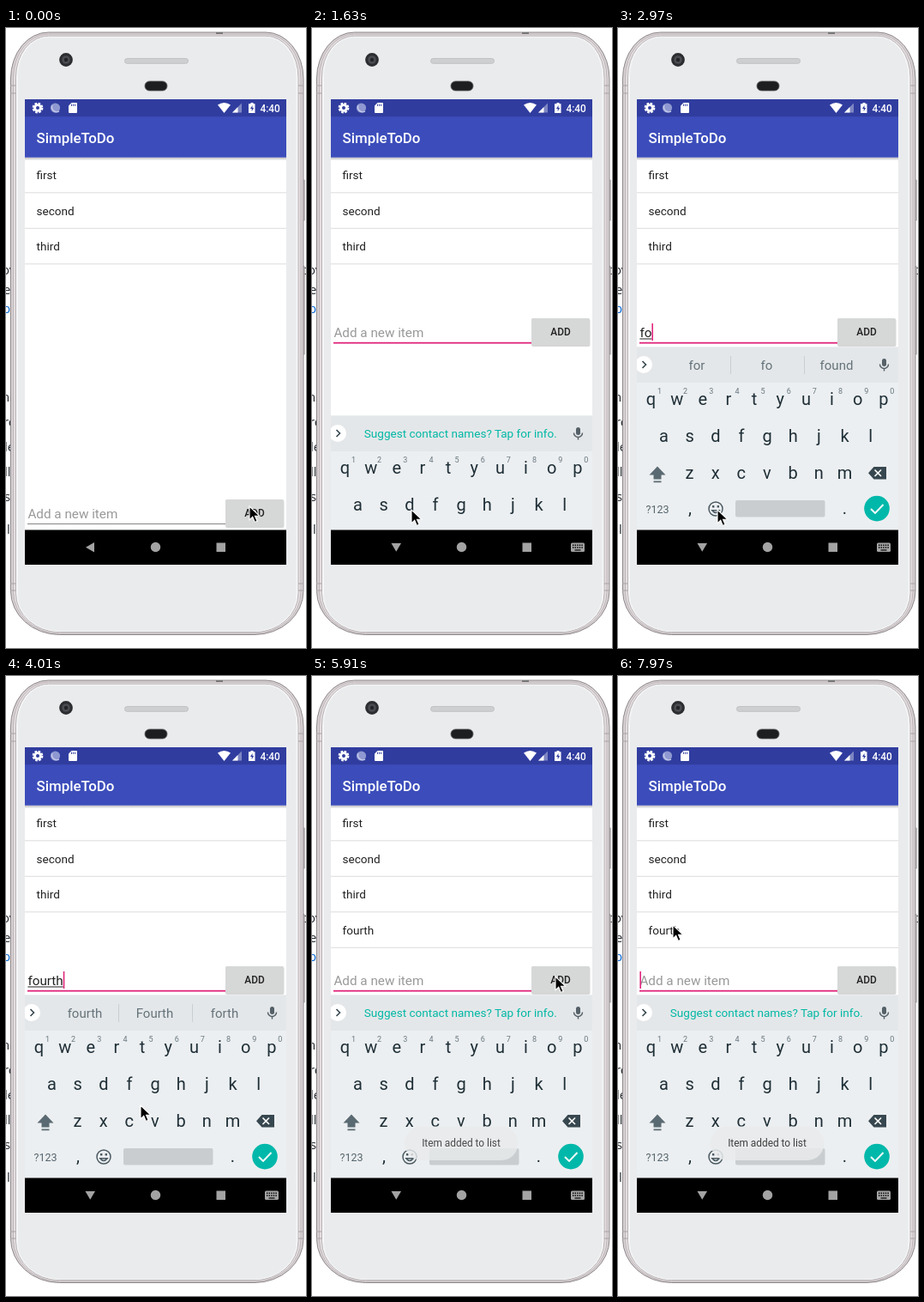
Write an HTML page that moves like this. It is 350x722 px and loops after 8000 ms.

```html
<!DOCTYPE html>
<html lang="en">
<head>
<meta charset="utf-8">
<title>To-do list</title>
<style>
  html, body { margin: 0; width: 100%; height: 100%; overflow: hidden; background: #fff; }
  svg { display: block; width: 350px; height: 722px; font-family: Roboto, sans-serif; }
  text { white-space: pre; }
  .mid { text-anchor: middle; }
  .medium { font-weight: 500; }
</style>
</head>
<body>
<svg viewBox="0 0 350 722">
  <defs>
    <clipPath id="screen"><rect x="22" y="83" width="305" height="542"/></clipPath>
    <clipPath id="content"><rect x="22" y="83" width="305" height="501.5"/></clipPath>
    <linearGradient id="shade" x2="0" y2="1">
      <stop stop-color="#000" stop-opacity=".26"/>
      <stop offset="1" stop-color="#000" stop-opacity="0"/>
    </linearGradient>
  </defs>

  <g id="page" font-size="15" font-family="Open Sans, sans-serif"></g>

  <g id="phone">
    <path d="M346 177h2.4v47H346zM346 278h2.4v102H346z" fill="#c4bdc0" stroke="#958f92" stroke-width=".6"/>
    <g id="shell"></g>
    <path d="M5 67h6M5 76h6M341 67h6M341 76h6M5 647h6M5 655h6M341 647h6M341 655h6" stroke="#a8a1a4"/>
    <path d="M245 6h8" stroke="#777" stroke-width="2"/>
    <circle cx="70" cy="37" r="7.9" fill="#2c2d30"/>
    <circle cx="70" cy="37" r="4.8" fill="#4a4c51"/>
    <circle cx="70" cy="37" r="2.2" fill="#222326"/>
    <rect x="138.5" y="35.5" width="74" height="5.8" rx="2.8" fill="#cdcfd1" stroke="#b9bbbd" stroke-width=".8"/>
    <rect x="162" y="62" width="26" height="11" rx="5.5" fill="#1d1e20" stroke="#55575a" stroke-width=".8"/>
  </g>

  <g clip-path="url(#screen)">
    <path d="M22 83h305v542H22z" fill="#fff"/>
    <g id="list" font-size="13.55" fill="#212121"></g>
    <path d="M22 150.8h305v3.6H22z" fill="url(#shade)"/>
    <path d="M22 103h305v47.8H22z" fill="#3c4dbb"/>
    <path d="M22 83h305v20.3H22z" fill="#303d9f"/>
    <text class="medium" x="35.5" y="133.5" font-size="16.9" fill="#fff">SimpleToDo</text>

    <g id="status" fill="#fff">
      <circle cx="37" cy="93" r="5.3" fill="none" stroke="#fff" stroke-width="2.2" stroke-dasharray="2.6 1.56"/>
      <circle cx="37" cy="93" r="3.4" fill="none" stroke="#fff" stroke-width="2.8"/>
      <circle cx="57.5" cy="93" r="5.6" fill="#8f98d0"/>
      <path d="M54 90a5.6 5.6 0 0 0 8 7" fill="none" stroke="#c4c9e8" stroke-width="1.4"/>
      <path d="M76.5 87H82q1 0 1 1v10q0 1-1 1h-8q-1 0-1-1v-7.5z"/>
      <path d="M76.5 88.5v2.5M78.5 88.5v2.5M80.5 88.5v2.5" stroke="#303d9f" stroke-width=".9"/>
      <path d="M247 89.5q7.5-5 15 0l-7.5 9.5z"/>
      <path d="M275 87.5v11h-11z" opacity=".38"/>
      <path d="M270.5 92v6.5H264z"/>
      <path d="M285.5 87h3v1.2h2V99H283V88.2h2.5z"/>
      <path d="M287.5 90l-2.5 4h1.7v3l2.5-4h-1.7z" fill="#303d9f"/>
      <text class="medium" x="296.4" y="97.5" font-size="11.86">4:40</text>
    </g>

    <g id="field">
      <rect id="line" x="25" width="231"/>
      <text id="hint" x="25.4" y="571" font-size="15.25">Add a new item</text>
      <text id="typed" x="25.4" y="571" font-size="15.25" fill="#212121"></text>
      <rect id="under" x="25.4" y="572.5" height="1" fill="#212121"/>
      <rect id="caret" y="555" width="1.6" height="20" fill="#e0267c"/>
      <rect x="256" y="550" width="68.5" height="32" rx="2" fill="#000" opacity=".16"/>
      <rect x="256" y="549" width="68" height="31.5" rx="1.5" fill="#d6d7d7"/>
      <text class="mid medium" x="290" y="568.8" font-size="11.86" fill="#212121">ADD</text>
    </g>

    <g clip-path="url(#content)">
      <g id="keyboard">
        <path d="M22 371.5h305V585H22z" fill="#eceff1"/>
        <path d="M22 371.5h305V413H22z" fill="#e4e7e9"/>
        <circle cx="30" cy="392" r="10" fill="#fff"/>
        <path d="M28.5 388l4 4-4 4" fill="none" stroke="#37474f" stroke-width="1.6"/>
        <text id="tip" class="mid" x="173.3" y="397" font-size="13.55" fill="#00b8a5">Suggest contact names? Tap for info.</text>
        <g id="words" font-size="15" fill="#65737a"></g>
        <rect x="308" y="385" width="5" height="9" rx="2.5" fill="#546067"/>
        <path d="M305.5 391.5a5 5 0 0 0 10 0M310.5 396.5v3" fill="none" stroke="#546067" stroke-width="1.5"/>
        <g id="keys" font-size="20" fill="#1f2f37"></g>
        <path d="M46 510.5l9.5 10h-5v5h-9v-5h-5zM41.5 527.5h9v1.8h-9z" fill="#5a6a72"/>
        <path d="M298.500 511H313v14.5h-14.5l-6.5-7.25z" fill="#37474f"/>
        <path d="M299.5 514.5l7.5 7.5m0-7.5l-7.5 7.5" stroke="#fff" stroke-width="1.7"/>
        <text class="mid" x="46" y="564.5" font-size="12.5" fill="#54646c">?123</text>
        <g fill="none" stroke="#4a5a62" stroke-width="1.5">
          <circle cx="114" cy="560" r="8"/>
          <path d="M109.8 561.8q4.2 5.5 8.4 0z"/>
        </g>
        <path d="M110 556h2.4v2.4H110zM115.6 556h2.4v2.4h-2.4z" fill="#4a5a62"/>
        <rect x="137" y="550" width="104.5" height="19.5" rx="2" fill="#c9cdd0"/>
        <circle cx="302" cy="559.6" r="14.8" fill="#00b8aa"/>
        <path d="M295 560l5 5 9.5-10" fill="none" stroke="#fff" stroke-width="1.9"/>
      </g>
    </g>

    <g id="toast">
      <rect x="108" y="524.5" width="132.500" height="39.5" rx="19.7" fill="#e9ebec"/>
      <text class="mid" x="174" y="548" font-size="11.86" fill="#212121">Item added to list</text>
    </g>

    <path d="M22 584.5h305V625H22z" fill="#000"/>
    <g fill="#a3a3a3">
      <path id="back"/>
      <circle cx="174.5" cy="604.5" r="5.7"/>
      <path d="M245.5 599.5H256V610h-10.5z"/>
      <g id="switcher">
        <rect x="302" y="599.5" width="16" height="10.5" rx="1.5"/>
        <path d="M304 602.3h12M304 605h12" stroke="#000" stroke-width="1.4" stroke-dasharray="1.4 1.2"/>
        <path d="M306.5 608h7" stroke="#000" stroke-width="1.2"/>
      </g>
    </g>
  </g>

  <path id="pointer" d="M0 0v15.8l3.7-3.5 2.6 6.1 2.8-1.2-2.6-6h5.2z" fill="#000" stroke="#fff" stroke-width="1.1"/>
</svg>

<script>
const LOOP = 8000;
const $ = id => document.getElementById(id);

function add(parent, tag, attrs, text) {
  const el = document.createElementNS("http://www.w3.org/2000/svg", tag);
  for (const k in attrs) el.setAttribute(k, attrs[k]);
  if (text) el.textContent = text;
  return parent.appendChild(el);
}

// Page slivers beside the phone
[["ov", 287, -5], ["e", 310, -3], ["p", 332, -4, "#0366d6"], ["n", 435, -5], ["re", 464, -3], ["le", 493, -2],
 ["ll", 522, -2], ["s", 551, -2], ["l", 589, 1], ["to", 287, 345]].forEach(([s, y, x, fill = "#24292e"]) =>
  add($("page"), "text", { x, y, fill }, s));

// Phone body as nested outlines
function outline(d) {
  const l = 5.5 + d, r = 347 - d, t = 5 + d * .7, b = 706.5 - d * .5;
  const tx = 44 - d, ty = 54 - d, bx = 57 - d, by = 51 - d;
  return `M${l} ${t + ty}A${tx} ${ty} 0 0 1 ${l + tx} ${t}H${r - tx}A${tx} ${ty} 0 0 1 ${r} ${t + ty}` +
    `V${b - by}A${bx} ${by} 0 0 1 ${r - bx} ${b}H${l + bx}A${bx} ${by} 0 0 1 ${l} ${b - by}z`;
}
[[0, "#d9d2d5", "#8d878a"], [3, "#e3dddf", "#bdb5b8"], [6, "#f8f8f9", "#b9b3b6"], [8, "#e9ebed", "#f3f4f5"]]
  .forEach(([d, fill, stroke]) => add($("shell"), "path", { d: outline(d), fill, stroke }));

// List rows
const rows = ["first", "second", "third", "fourth"].map((s, i) => {
  const g = add($("list"), "g", { transform: `translate(0 ${i * 41.5})` });
  add(g, "text", { x: 35.5, y: 176 }, s);
  add(g, "rect", { x: 22, y: 191.3, width: 305, height: 1, fill: "#dcdcdc" });
  return g;
});

// Keys
[["qwertyuiop", 38.5, 439], ["asdfghjkl", 53.5, 482], ["zxcvbnm", 83.5, 525]].forEach(([letters, x0, y], row) =>
  [...letters].forEach((c, i) => {
    const x = x0 + i * 30.15;
    add($("keys"), "text", { x, y, class: "mid" }, c);
    if (!row) add($("keys"), "text", { x: x + 10, y: 425.5, class: "mid", "font-size": 9, fill: "#68777f" }, `${(i + 1) % 10}`);
  }));
add($("keys"), "text", { x: 84, y: 566, class: "mid" }, ",");
add($("keys"), "text", { x: 264.5, y: 566, class: "mid" }, ".");

// Suggestions
const picks = [92, 173.5, 255].map(x => add($("words"), "text", { x, y: 398, class: "mid" }));
[131, 217].forEach(x => add($("words"), "rect", { x, y: 382, width: 1, height: 21, fill: "#c9ced1" }));

// Tables of [time, value...]; each value holds until the next
const pointer = [[0, 284, 557], [600, 196, 561], [750, 116, 561], [4010, 157, 500], [4150, 204, 448],
  [4300, 246, 399], [4450, 274, 364], [4590, 283, 352], [4740, 284, 350], [6210, 268, 351], [6350, 214, 353],
  [6500, 138, 353], [6650, 91, 350], [6800, 84, 332], [6940, 78, 308], [7090, 73, 290], [7240, 70, 283],
  [7380, 66, 287], [7530, 64, 290]];
const typing = [[0, ""], [2820, "f", "f", "F", "for"], [2970, "fo", "for", "fo", "found"],
  [3270, "fou", "you", "four", "found"], [3410, "four", "four", "Four", "your"],
  [3560, "fourt", "fourth", "Fourt", "fourty"], [4010, "fourth", "fourth", "Fourth", "forth"], [5480, ""]];
const blink = [[0, 0], [1780, 1], [2080, 0], [2520, 1], [4450, 0], [5040, 1], [5330, 0], [5480, 1],
  [5770, 0], [6210, 1], [6650, 0], [7100, 1], [7530, 0], [7970, 1]];
const slide = [[0, 213], [1630, 80], [1780, 0]];
const fade = [[0, 0], [5620, .2], [5770, .5], [5910, .8], [6060, 1], [7830, .95], [7970, .85]];

const at = (table, t) => table.filter(s => s[0] <= t).pop().slice(1);
const set = (id, attrs) => { for (const k in attrs) $(id).setAttribute(k, attrs[k]); };
const show = (el, on) => { el.style.display = on ? "" : "none"; };

function draw(t) {
  const [x, y] = at(pointer, t);
  const [typed, ...words] = at(typing, t);
  const focused = t >= 1200, open = t >= 1630;

  set("pointer", { transform: `translate(${x} ${y})` });
  set("field", { transform: `translate(0 ${open ? -211 : 0})` });
  set("line", focused ? { y: 576.8, height: 1.8, fill: "#e0267c" } : { y: 577, height: 1, fill: "#858585" });
  set("hint", { fill: focused && !open ? "#737373" : "#999" });
  set("back", { d: open ? "M92.5 600H104l-5.75 9.8z" : "M103 599v11.5l-10-5.75z" });
  set("keyboard", { transform: `translate(0 ${at(slide, t)[0]})` });
  set("toast", { opacity: at(fade, t)[0] });

  $("typed").textContent = typed;
  const width = typed ? $("typed").getComputedTextLength() : 0;
  set("under", { width });
  set("caret", { x: 25.4 + width });
  words.forEach((w, i) => { picks[i].textContent = w; });

  show($("hint"), !typed);
  show($("tip"), !typed);
  show($("words"), typed);
  show($("caret"), at(blink, t)[0]);
  show($("switcher"), open);
  show(rows[3], t >= 5480);
}

const start = performance.now();
function tick() {
  draw((performance.now() - start) % LOOP);
  requestAnimationFrame(tick);
}
tick();
</script>
</body>
</html>
```
